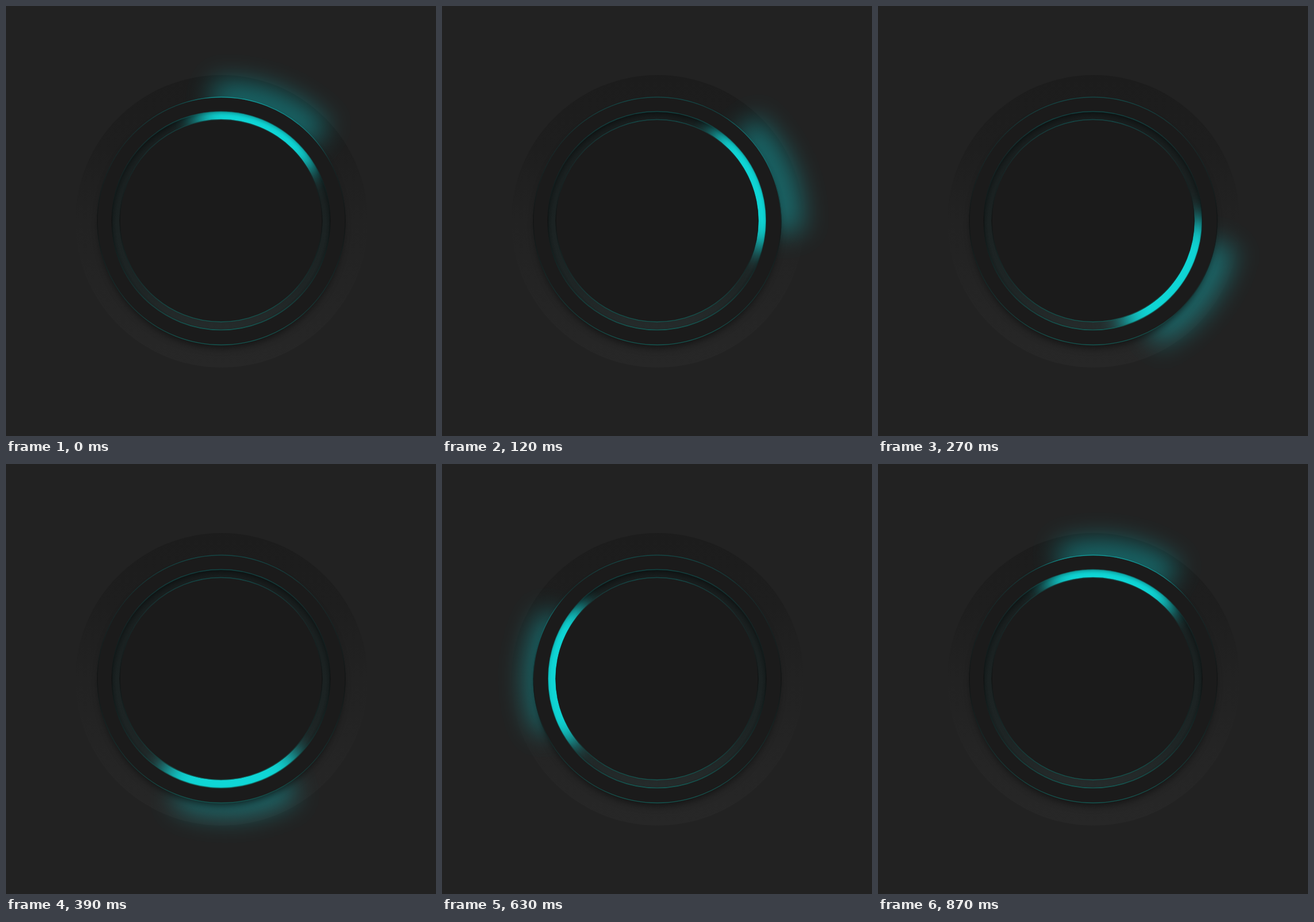
An HTML page that plays this animation: 748x748 px, repeating every 0.9 s.

```html
<!DOCTYPE html>
<html lang="en">
<head>
<meta charset="utf-8">
<title>Ring loader</title>
<style>
  html, body { margin: 0; width: 100%; height: 100%; overflow: hidden; background: #222; }
  svg { display: block; width: 100vw; height: 100vh; }
</style>
</head>
<body>
<svg viewBox="0 0 748 748">
  <defs>
    <linearGradient id="halo" x1="0" y1="0" x2="0" y2="1">
      <stop offset="0" stop-color="#1c1c1c"/>
      <stop offset=".25" stop-color="#1e1e1e"/>
      <stop offset=".5" stop-color="#222"/>
      <stop offset=".62" stop-color="#232323"/>
      <stop offset="1" stop-color="#272727"/>
    </linearGradient>
    <linearGradient id="groove" x1="0" y1="0" x2="0" y2="1">
      <stop offset="0" stop-color="#181d1d"/>
      <stop offset=".5" stop-color="#1b2222"/>
      <stop offset=".8" stop-color="#1e2525"/>
      <stop offset="1" stop-color="#252b2b"/>
    </linearGradient>
    <linearGradient id="rim" x1="0" y1="0" x2="0" y2="1">
      <stop offset="0" stop-color="#0f6a68" stop-opacity=".55"/>
      <stop offset=".2" stop-color="#143c3c" stop-opacity=".4"/>
      <stop offset=".5" stop-color="#0c0e0e" stop-opacity=".6"/>
      <stop offset=".8" stop-color="#143c3a" stop-opacity=".6"/>
      <stop offset="1" stop-color="#117068" stop-opacity=".7"/>
    </linearGradient>
    <linearGradient id="topFade" x1="0" y1="0" x2="0" y2="1">
      <stop offset="0" stop-color="#fff"/>
      <stop offset=".3" stop-color="#aaa"/>
      <stop offset=".55" stop-color="#000"/>
    </linearGradient>
    <filter id="soft" filterUnits="userSpaceOnUse" x="-400" y="-400" width="800" height="800" color-interpolation-filters="sRGB">
      <feGaussianBlur stdDeviation="23"/>
    </filter>
    <filter id="shade" filterUnits="userSpaceOnUse" x="0" y="0" width="748" height="748" color-interpolation-filters="sRGB">
      <feGaussianBlur stdDeviation="7"/>
    </filter>
    <filter id="inset" filterUnits="userSpaceOnUse" x="0" y="0" width="748" height="748" color-interpolation-filters="sRGB">
      <feGaussianBlur stdDeviation="3"/>
    </filter>
    <clipPath id="well"><circle cx="374" cy="373.5" r="190"/></clipPath>
    <mask id="edge" maskUnits="userSpaceOnUse" x="0" y="0" width="748" height="748">
      <circle cx="374.5" cy="374" r="215.5" fill="none" stroke="url(#topFade)" stroke-width="1.3"/>
    </mask>
  </defs>

  <rect width="748" height="748" fill="#222"/>
  <circle cx="375" cy="374.5" r="254.5" fill="url(#halo)"/>

  <g class="spin"><path id="glow" fill="none" stroke="#0fd0d4" stroke-width="60" opacity=".42" filter="url(#soft)"/></g>

  <circle cx="374.5" cy="383" r="211" fill="#0c0c0c" opacity=".75" filter="url(#shade)"/>
  <circle cx="374.5" cy="374" r="216" fill="#1b1b1b"/>
  <circle cx="374.5" cy="374" r="215.5" fill="none" stroke="url(#rim)" stroke-width="1.3"/>
  <g mask="url(#edge)">
    <g class="spin"><path id="edgeLight" fill="none" stroke="#12d6d6" stroke-width="120" opacity=".55" filter="url(#soft)"/></g>
  </g>

  <g clip-path="url(#well)">
    <circle cx="374" cy="373.5" r="190" fill="url(#groove)"/>
    <circle cx="374" cy="378" r="195" fill="none" stroke="#0c0e0e" stroke-width="10" opacity=".6" filter="url(#inset)"/>
    <g class="spin"><path id="light" fill="none" stroke="#0fd6d6" stroke-width="120" filter="url(#soft)"/></g>
    <circle cx="374" cy="377" r="196" fill="none" stroke="#0c1616" stroke-width="10" opacity=".35" filter="url(#inset)"/>
  </g>
  <circle cx="374" cy="373.5" r="190" fill="none" stroke="url(#rim)" stroke-width="1.6"/>
  <circle cx="374" cy="373.5" r="176.5" fill="#1b1b1b"/>
  <circle cx="374" cy="373.5" r="176" fill="none" stroke="url(#rim)" stroke-width="1.5"/>
</svg>
<script>
  const LOOP = 900, STEP = 30, START = 20.5;
  // The light turns about a point slightly right of the dial's centre.
  const PIVOT = [385, 372];
  const spins = document.querySelectorAll('.spin');

  // Arc of radius r around the origin, spread evenly about twelve o'clock.
  function arc(id, r, half) {
    const a = half * Math.PI / 180;
    const x = r * Math.sin(a), y = -r * Math.cos(a);
    document.getElementById(id).setAttribute('d', `M${-x} ${y}A${r} ${r} 0 0 1 ${x} ${y}`);
  }

  function draw(ms) {
    const step = Math.floor((ms % LOOP + 0.01) / STEP);
    const angle = START + step * 360 * STEP / LOOP;
    for (const g of spins) g.setAttribute('transform', `translate(${PIVOT}) rotate(${angle})`);
  }

  function tick() {
    draw(performance.now());
    requestAnimationFrame(tick);
  }

  arc('glow', 211, 27);
  arc('edgeLight', 216, 32);
  arc('light', 183, 37);
  tick();
</script>
</body>
</html>
```
